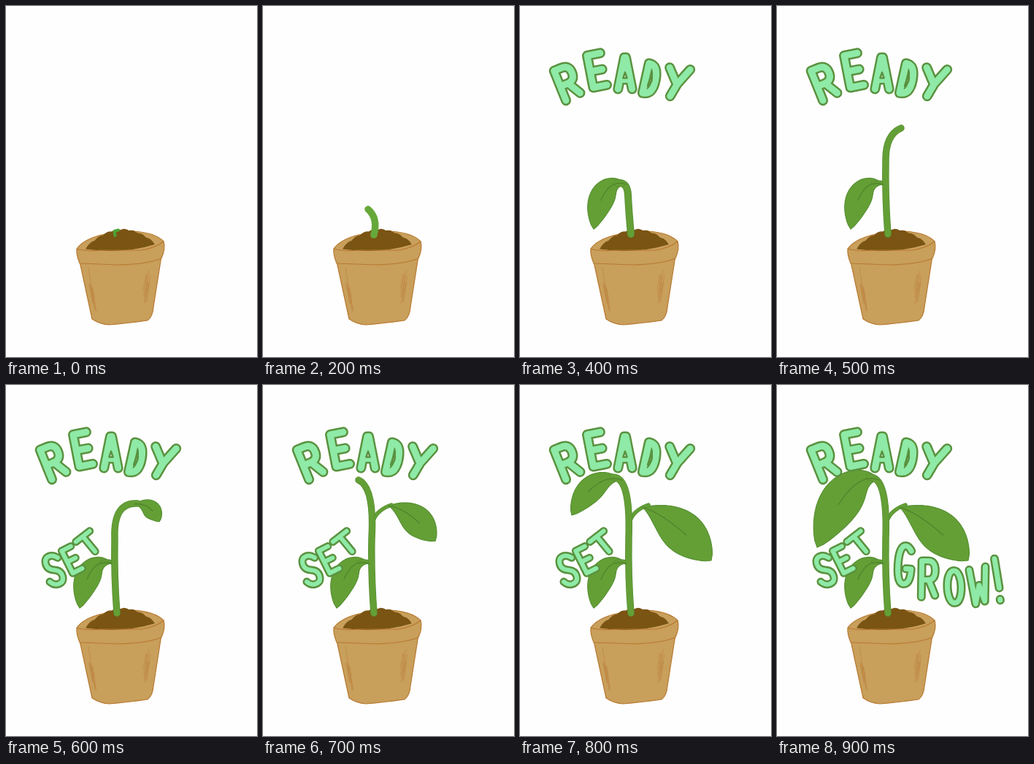
Write an HTML page that moves like this. It is 344 px wide and 480 px high and loops after 1100 ms.

```html
<!DOCTYPE html>
<html lang="en">
<head>
<meta charset="utf-8">
<title>Ready, set, grow!</title>
<style>
html, body { margin: 0; width: 100%; height: 100%; overflow: hidden; background: #fefefe; }
svg { display: block; width: 100vw; height: 100vh; }
path { fill: none; stroke-linejoin: round; stroke-linecap: round; vector-effect: non-scaling-stroke; }
</style>
</head>
<body>
<svg id="stage" viewBox="0 0 344 480" role="img" aria-label="READY SET GROW!"></svg>
<script>
const LOOP = 1100;
const paper = '#fefefe', green = '#649f36', edge = '#568f32', vein = '#4f842b';
const mint = '#8eeaa6', ink = '#5a913f', clay = '#c89f5b', rim = '#b87931', soil = '#7a5413';

// Pen strokes of each letter, y from -1 to 1; the optional second path is a counter.
const glyphs = {
  R: ['M-.45 1V-.9H0Q.5 -.9 .5 -.4Q.5 .1 0 .1H-.45M.05 .1L.5 .9'],
  E: ['M.42 -1H-.4V1H.45M-.4 0H.35'],
  A: ['M-.45 1L-.05 -1H.05L.45 1M-.3 .4H.3', 'M0 -.05L.12 .3H-.12Z'],
  D: ['M-.3 -1Q.33 -1 .33 0Q.33 1 -.35 1Z', 'M0 -.3Q.22 .1 -.1 .45Z'],
  Y: ['M.45 -1.05L0 .2L-.14 1.15M-.9 -.65L-.05 .2'],
  S: ['M.45 -.75Q.2 -1 0 -1Q-.45 -1 -.45 -.55Q-.45 -.15 0 0Q.45 .15 .45 .55Q.45 1 0 1Q-.3 1 -.5 .7'],
  T: ['M-.85 -.9H.85M0 -.9L.05 1'],
  G: ['M.4 -.75Q.2 -1 0 -1Q-.47 -1 -.47 0Q-.47 1 0 1Q.47 1 .47 .2H.1'],
  O: ['M0 -.85C.65 -.85 .65 .85 0 .85C-.65 .85 -.65 -.85 0 -.85Z'],
  W: ['M-.6 -.85L-.35 .95L0 0L.3 .85L.55 -.95'],
  '!': ['M0 -1.1L.05 .45M0 1.05V1.1']
};

const stage = document.getElementById('stage');
const parts = [];
const lerp = (a, b, k) => a + (b - a) * k;
const mix = (p, q, k) => p.map((v, i) => lerp(v, q[i], k));

let seed = 7;
const random = () => (seed = seed * 16807 % 2147483647) / 2147483647;

function add(d, attrs, from = 0, to = LOOP) {
  const node = document.createElementNS('http://www.w3.org/2000/svg', 'path');
  node.setAttribute('d', d);
  for (const key in attrs) node.setAttribute(key, attrs[key]);
  stage.append(node);
  parts.push({ node, from, to });
}

function line(d, stroke, width, from, to) {
  add(d, { stroke, 'stroke-width': width }, from, to);
}

function shape(d, fill, stroke, from, to) {
  add(d, { style: `fill:${fill}`, stroke, 'stroke-width': 1.2 }, from, to);
}

function stem(d, width, from, to) {
  line(d, edge, width, from, to);
  line(d, green, width - 1.6, from, to);
}

// Leaf around a bent midrib; it is widest past the middle.
function leaf(base, bend, tip, width, from, to) {
  const left = [], right = [], rib = [];
  for (let i = 0; i <= 30; i++) {
    const s = i / 30;
    const a = mix(base, bend, s), b = mix(bend, tip, s);
    const [x, y] = mix(a, b, s);
    const angle = Math.atan2(b[1] - a[1], b[0] - a[0]);
    const w = width * Math.max(0, Math.sin(Math.PI * s ** 1.5)) ** 0.75;
    const dx = Math.sin(angle) * w, dy = Math.cos(angle) * w;
    left.push([x + dx, y - dy]);
    right.unshift([x - dx, y + dy]);
    if (s < 0.7) rib.push([x, y]);
  }
  shape('M' + left.concat(right).join('L') + 'Z', green, edge, from, to);
  return () => line('M' + rib.join('L'), vein, 1.3, from, to);
}

function drawPot() {
  shape('M100 345L118 428Q128 435 141 436Q165 434 194 430Q201 425 202 412L213 342Z', clay, rim);
  shape('M97 332C108 316 140 308 175 308Q205 310 216 322Q219 332 213 345Q195 353 155 354L101 352Q96 340 97 332Z', clay, rim);

  const mound = [];
  for (let i = 0; i <= 40; i++) {
    const t = i / 40;
    const bump = Math.abs(Math.sin(t * 25)) * 1.6;
    mound.push([lerp(110, 203, t), lerp(332, 326, t) - 22 * Math.sin(Math.PI * t) ** 0.85 - bump]);
  }
  shape('M' + mound.join('L') + 'Q160 339 110 332Z', soil, soil);
  line('M97 332Q110 336 130 334H185Q205 331 216 322', rim, 1.2);

  for (let i = 0; i < 8; i++) {
    for (const [x, lean] of [[113, 5], [192, -4]]) {
      const top = 358 + random() * 30;
      line(`M${x + i * 0.8} ${top}l${lean} ${18 + random() * 16}`, '#bd8744', 0.7);
    }
  }
}

function drawPlant() {
  line('M149.5 314L148.5 308L154 306.5', '#4da334', 4, 0, 200);
  line('M152 313Q158 290 144 278', '#67a83a', 9.5, 200, 400);

  const veins = [leaf([146, 244], [112, 232], [101, 305], 17, 400)];
  for (let i = 0; i < 3; i++) {
    const k = i / 2, from = 600 + i * 100;
    veins.push(leaf(
      mix([176, 163], [168, 167], k), mix([198, 160], [208, 180], k), mix([210, 187], [262, 240], k),
      lerp(12, 28, k), from, i < 2 ? from + 100 : LOOP));
  }
  veins.push(leaf([140, 130], [105, 118], [71, 178], 17, 800, 900));
  veins.push(leaf([140, 130], [100, 113], [55, 222], 28, 900));

  const trunk = 'M152 312Q148 260 149 210';
  stem('M152 312Q149 280 148 258Q147 240 133 242', 10, 400, 500);
  stem('M148 244Q142 240 132 242', 6, 500);
  stem(trunk + 'Q149 176 170 167', 9.5, 500, 600);
  stem(trunk + 'Q147 160 180 162', 9.5, 600, 700);
  stem('M150 190Q153 172 176 164', 5.5, 700);
  stem(trunk + 'Q153 140 131 130', 9.5, 700, 800);
  stem(trunk + 'Q152 125 127 126', 9.5, 800);
  veins.forEach(draw => draw());
}

// Size and tilt change evenly from the first letter to the last.
function word(text, from, { at, size, tilt, pen, squeeze = 1 }) {
  [...text].forEach((char, i) => {
    const k = i / (text.length - 1);
    const scale = lerp(...size, k);
    const transform = `translate(${at[i]}) rotate(${lerp(...tilt, k)}) scale(${scale * squeeze} ${scale})`;
    const [strokes, counter] = glyphs[char];
    add(strokes, { transform, stroke: ink, 'stroke-width': pen }, from);
    add(strokes, { transform, stroke: mint, 'stroke-width': pen - 5 }, from);
    if (counter) add(counter, { transform, stroke: ink, 'stroke-width': 2.5, style: `fill:${paper}` }, from);
  });
}

function drawWords() {
  word('READY', 400, {
    at: [[64, 104], [105, 88], [144, 92], [179, 100], [217, 103]],
    size: [23, 20], tilt: [-22, 22], pen: 14
  });
  word('SET', 600, {
    at: [[66, 253], [90, 239], [113, 217]],
    size: [20, 14], tilt: [-15, -38], pen: 11
  });
  word('GROW!', 900, {
    at: [[175, 246], [207, 264], [243, 276], [277, 274], [302, 266]],
    size: [26, 26], tilt: [4, -8], pen: 12, squeeze: 0.75
  });
}

function update(t) {
  for (const { node, from, to } of parts) {
    node.style.display = t >= from && t < to ? '' : 'none';
  }
}

drawPot();
drawPlant();
drawWords();

const start = performance.now();
function tick() {
  update((performance.now() - start) % LOOP);
  requestAnimationFrame(tick);
}
tick();
</script>
</body>
</html>
```
